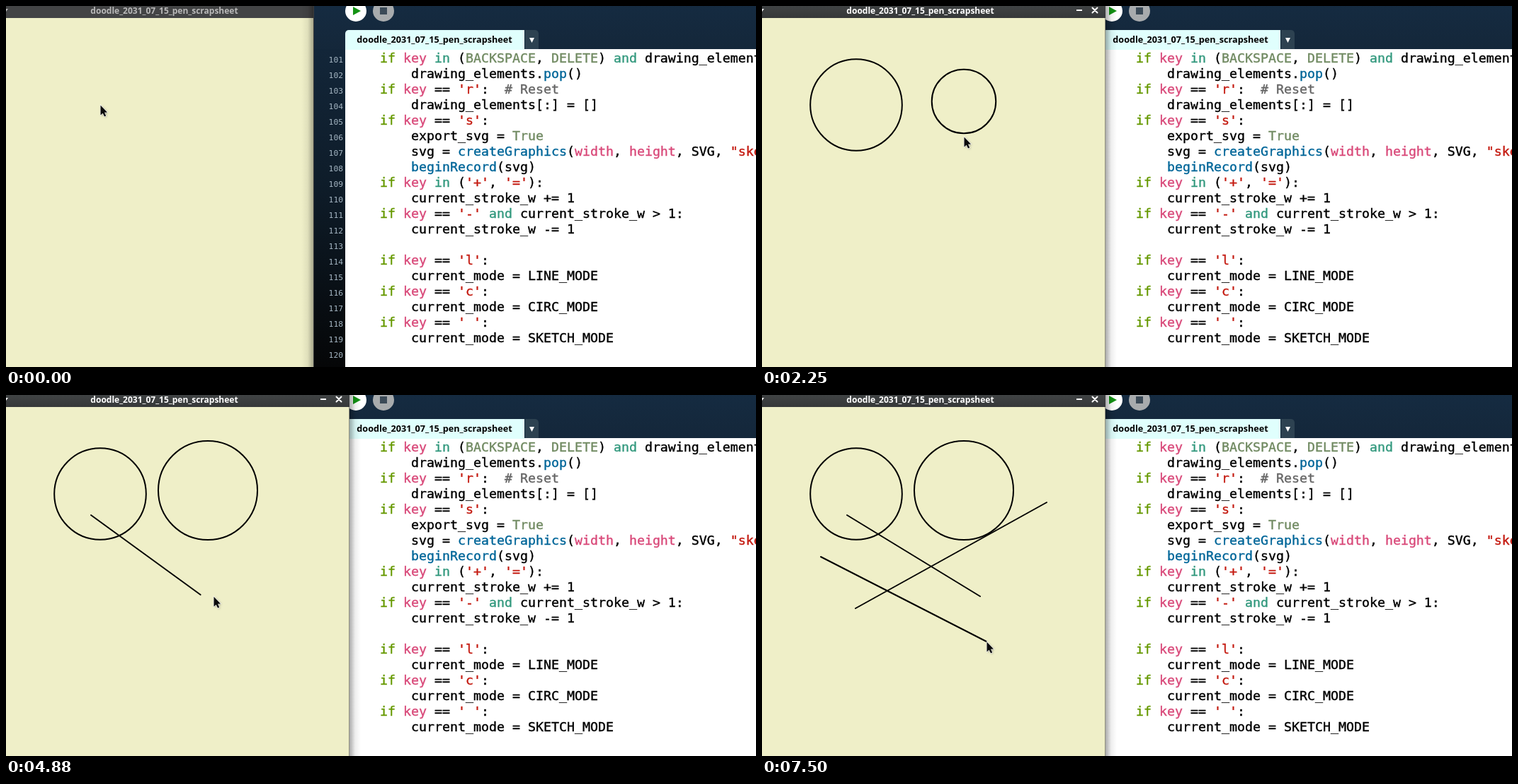
An HTML page with a canvas that plays this animation: 1059x511 px, repeating every 8000 ms.

```html
<!DOCTYPE html>
<html lang="en">
<head>
<meta charset="utf-8">
<title>Drawing tool</title>
<style>
  html, body { margin: 0; width: 100%; height: 100%; overflow: hidden; }
  canvas { display: block; }
</style>
</head>
<body>
<canvas id="stage" width="1059" height="511"></canvas>
<script>
const ctx = document.getElementById('stage').getContext('2d');
const W = 1059, H = 511, LOOP = 8000, STEP = 125;
const NAME = 'doodle_2031_07_15_pen_scrapsheet';
const MONO = '"DejaVu Sans Mono", monospace';
const SANS = '"Open Sans", "Noto Sans", sans-serif';

const CODE = `    if key in (BACKSPACE, DELETE) and drawing_elements:
        drawing_elements.pop()
    if key == 'r':  # Reset
        drawing_elements[:] = []
    if key == 's':
        export_svg = True
        svg = createGraphics(width, height, SVG, "ske
        beginRecord(svg)
    if key in ('+', '='):
        current_stroke_w += 1
    if key == '-' and current_stroke_w > 1:
        current_stroke_w -= 1

    if key == 'l':
        current_mode = LINE_MODE
    if key == 'c':
        current_mode = CIRC_MODE
    if key == ' ':
        current_mode = SKETCH_MODE
`.split('\n');

const TOKENS = [
  [/^('[^']*'|"\w*)/, '#c41a10'],
  [/^#.*/, '#666666'],
  [/^if\b/, '#669900'],
  [/^(in|and)\b/, '#33997e'],
  [/^(key|width|height)\b/, '#d94a7a'],
  [/^(BACKSPACE|DELETE|True)\b/, '#718a62'],
  [/^(pop|createGraphics|beginRecord)\b/, '#006699'],
  [/^(\w+|\s+|.)/, '#000000']
];

const smooth = u => u * u * (3 - 2 * u);
const easeOut = u => 1 - (1 - u) ** 2;

// The pointer leaves for `from`, presses there, drags to `to` and lets go.
// Times are in steps; `bow` bends the drag, `arc` bends the approach,
// `lag` is how far the drawing trails the pointer.
const STROKES = [
  { kind: 'circle', from: [133, 140], to: [184, 180], leave: 0, press: 1, release: 10.3,
    bow: [290, 66], ease: smooth, lag: 0.35 },
  { kind: 'circle', from: [285, 135], to: [285, 205], leave: 12.5, press: 14.6, release: 22,
    ease: easeOut, lag: 0.4 },
  { kind: 'line', from: [120, 170], to: [308, 285], leave: 30, press: 32.2, release: 40.4,
    arc: [0, 70], bow: [0, 62], ease: smooth, lag: 0.8 },
  { kind: 'line', from: [402, 152], to: [132, 302], leave: 40.5, press: 46, release: 51,
    arc: [0, -150], bow: [0, -40], ease: easeOut, lag: 0.2 },
  { kind: 'line', from: [83, 229], to: [317, 349], leave: 52, press: 55, release: 59.7,
    ease: smooth, lag: 0.25 }
];

// Quadratic curve whose control point sits `bend` away from the middle
function curve(a, b, u, bend = [0, 0]) {
  return a.map((v, i) => v + (b[i] - v) * u + 2 * u * (1 - u) * bend[i]);
}

function progress(t, start, end) {
  return Math.min(1, Math.max(0, (t - start) / (end - start)));
}

function drag(s, t) {
  return curve(s.from, s.to, s.ease(progress(t, s.press, s.release)), s.bow);
}

function pointer(t) {
  const i = STROKES.findLastIndex(s => s.leave <= t);
  const s = STROKES[i];
  if (t >= s.press) return drag(s, t);
  const start = i ? STROKES[i - 1].to : s.from;
  return curve(start, s.from, easeOut(progress(t, s.leave, s.press)), s.arc);
}

function rect(x, y, w, h, fill) {
  ctx.fillStyle = fill;
  ctx.fillRect(x, y, w, h);
}

function poly(points, fill) {
  ctx.beginPath();
  points.forEach(([x, y]) => ctx.lineTo(x, y));
  ctx.closePath();
  ctx.fillStyle = fill;
  ctx.fill();
}

function round(x, y, w, h, radii, fill) {
  ctx.beginPath();
  ctx.roundRect(x, y, w, h, radii);
  ctx.fillStyle = fill;
  ctx.fill();
}

function label(str, x, y, font, fill, align = 'left') {
  ctx.font = font;
  ctx.textAlign = align;
  ctx.fillStyle = fill;
  ctx.fillText(str, x, y);
}

function fade(x0, y0, x1, y1, ...colors) {
  const g = ctx.createLinearGradient(x0, y0, x1, y1);
  colors.forEach((c, i) => g.addColorStop(i / (colors.length - 1), c));
  return g;
}

function drawCode() {
  const font = '18.27px ' + MONO;
  ctx.font = font;
  const cell = ctx.measureText('0').width;
  ctx.lineWidth = 0.4;
  CODE.forEach((line, row) => {
    let col = 0;
    while (col < line.length) {
      const rest = line.slice(col);
      const [re, color] = TOKENS.find(t => t[0].test(rest));
      const word = rest.match(re)[0];
      const x = 484 + col * cell, y = 80 + row * 22;
      label(word, x, y, font, color);
      ctx.strokeStyle = color;
      ctx.strokeText(word, x, y);
      col += word.length;
    }
  });
}

function drawEditor() {
  rect(0, 0, W, H, fade(0, 0, 0, H, '#14293e', '#0e1c29', '#050607'));
  rect(435, 0, W - 435, 61, fade(0, 0, 0, 61, '#152b41', '#14273a'));
  round(479, -8, 30, 30, 15, '#ffffff');
  poly([[490, 1], [501, 7], [490, 13]], '#149314');
  round(518, -8, 30, 30, 15, '#a8abad');
  rect(528, 2, 10, 10, '#3b4a57');

  rect(479, 61, W - 479, H - 61, '#ffffff');
  round(479, 34, 253, 28, [5, 0, 0, 0], '#e0fffd');
  label(NAME, 605, 52, 'bold 12.65px ' + SANS, '#000000', 'center');
  round(733, 34, 19, 27, [0, 5, 0, 0], '#2d4251');
  poly([[739, 45], [746, 45], [742.5, 52]], '#ffffff');

  for (let i = 0; i < 20; i++) {
    label(101 + i, 476, 80 + i * 22, '11.3px ' + MONO, '#a4b5c2', 'right');
  }
  drawCode();
}

function drawStroke(s, step) {
  if (step <= s.press) return;
  const [x, y] = s.from;
  const [ex, ey] = drag(s, step - s.lag);
  ctx.beginPath();
  if (s.kind === 'circle') {
    ctx.arc(x, y, Math.hypot(ex - x, ey - y), 0, Math.PI * 2);
  } else {
    ctx.moveTo(x, y);
    ctx.lineTo(ex, ey);
  }
  ctx.stroke();
}

function drawSketch(step) {
  const active = step > 0;
  const right = active ? 485 : 435;
  if (active) rect(485, 0, 16, H, fade(485, 0, 501, 0, '#0005', '#0001', '#0000'));
  rect(0, 0, right, H, '#efefc8');

  ctx.strokeStyle = '#000000';
  ctx.lineWidth = 2;
  ctx.lineCap = 'round';
  STROKES.forEach(s => drawStroke(s, step));
  if (active) drawEditorCover(right);

  const ink = active ? '#ffffff' : '#b9b9b9';
  rect(0, 0, right, 17, active ? fade(0, 0, 0, 17, '#404344', '#363839') : '#434445');
  label(NAME, 223.5, 11, 'bold 12px ' + SANS, ink, 'center');
  poly([[-3, 4], [3, 4], [0, 8]], ink);

  if (active) {
    rect(444, 5, 8, 2, ink);
    ctx.beginPath();
    ctx.moveTo(466.5, 2.5);
    ctx.lineTo(473.5, 9.5);
    ctx.moveTo(473.5, 2.5);
    ctx.lineTo(466.5, 9.5);
    ctx.strokeStyle = ink;
    ctx.stroke();
  } else {
    rect(417, 0, 18, H, fade(417, 0, 435, 0, '#0000', '#0001', '#0005'));
    rect(434, 0, 1, H, '#3b3c3d');
  }
}

function drawEditorCover(right) {
  rect(right - 1, 0, 1, H, '#55565099');
}

function drawPointer(x, y) {
  ctx.save();
  ctx.translate(Math.round(x), Math.round(y));
  const arrow = [[0.5, 0.5], [0.5, 14.5], [3.7, 11.8], [6, 16.6], [8.2, 15.6], [6, 10.8], [10, 10.4]];
  ctx.shadowColor = '#0006';
  ctx.shadowBlur = 3;
  ctx.shadowOffsetX = ctx.shadowOffsetY = 1;
  poly(arrow, '#ffffff');
  ctx.shadowColor = 'transparent';
  ctx.strokeStyle = '#ffffffcc';
  ctx.lineWidth = 1.4;
  ctx.stroke();
  poly(arrow, '#0b0b0b');
  ctx.restore();
}

// Steps begin on whole hundredths of a second
function stepAt(t) {
  const k = Math.floor(t / STEP);
  return Math.round(k * STEP / 10) * 10 > t ? k - 1 : k;
}

function frame(now) {
  const step = stepAt(now % LOOP);
  drawEditor();
  drawSketch(step);
  drawPointer(...pointer(step));
  requestAnimationFrame(frame);
}
requestAnimationFrame(frame);
</script>
</body>
</html>
```
